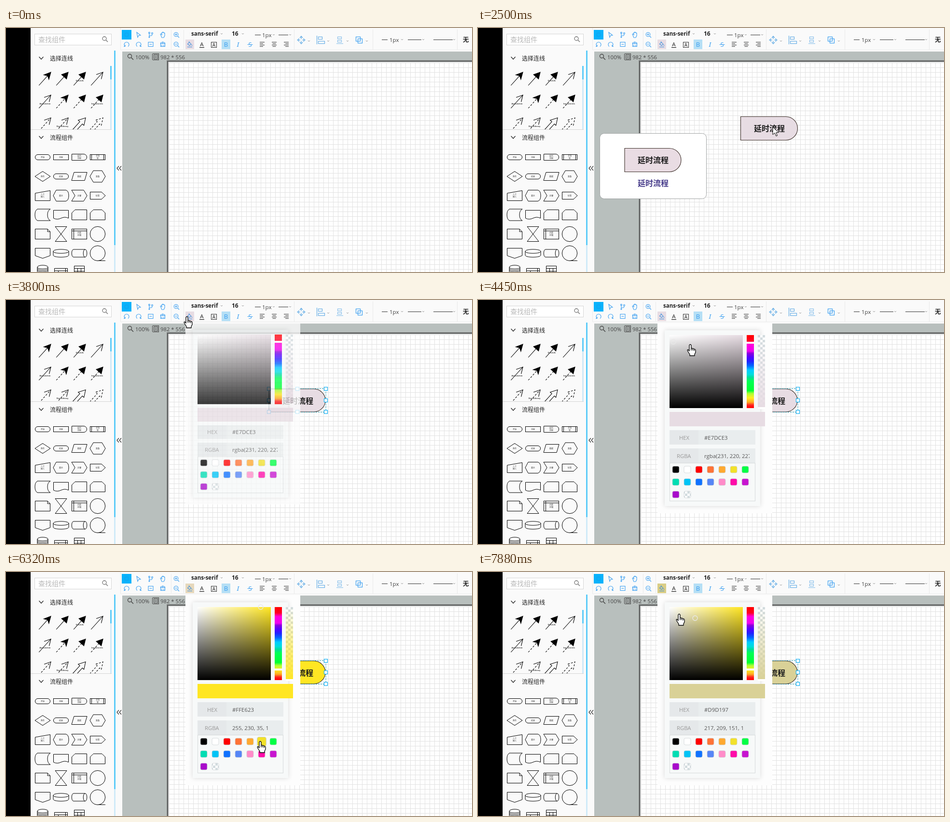
Animation of 966 by 508 pixels, one loop 8000 ms. Source, as an HTML page:

```html
<!DOCTYPE html>
<html lang="zh">
<head>
<meta charset="utf-8">
<style>
html, body { margin: 0; width: 100%; height: 100%; overflow: hidden; background: #fafafa; }
svg { display: block; width: 966px; height: 508px; font: 11.5px "Open Sans", "Noto Sans CJK SC", "Noto Sans CJK", sans-serif; }
text { stroke: none; fill: #444; }
.cjk { font-family: "Noto Sans CJK SC", "Noto Sans CJK", sans-serif; }
.big { font-size: 16px; font-weight: 700; fill: #1c1c1c; }
.tiny { font-size: 4px; fill: #333; text-anchor: middle; }
.paint { fill: var(--paint); }
.base { fill: var(--base); }
.icon { fill: var(--icon); }
.stop { stop-color: var(--paint); }
</style>
</head>
<body>
<svg id="stage" viewBox="0 0 966 508" fill="none"></svg>
<script>
const stage = document.getElementById('stage');
const path = (d, a = '') => `<path d="${d}" ${a}/>`;
const box = (x, y, w, h, a = '') => `<rect x="${x}" y="${y}" width="${w}" height="${h}" ${a}/>`;
const circle = (x, y, r, a = '') => `<circle cx="${x}" cy="${y}" r="${r}" ${a}/>`;
const text = (x, y, s, a = '') => `<text x="${x}" y="${y}" ${a}>${s}</text>`;
const group = (a, ...parts) => `<g ${a}>${parts.join('')}</g>`;
const at = (x, y, ...parts) => group(`transform="translate(${x} ${y})"`, ...parts);
const caret = (x, y) => path(`M${x - 2} ${y - 1}l2 2 2-2`, 'stroke="#999"');
const delay = (x, y, w, h, a) => path(`M${x} ${y}h${w - h / 2}a${h / 2} ${h / 2} 0 0 1 0 ${h}h${h / 2 - w}z`, a);
const gradient = (id, dir, stops) => `<linearGradient id="${id}" ${dir}>${stops}</linearGradient>`;
const stop = (o, c, a = '') => `<stop offset="${o}" stop-color="${c}" ${a}/>`;
const down = 'x1="0" y1="0" x2="0" y2="1"';

const hues = [
  [0, '#f00'], [.08, '#f02'], [.13, '#f0d'], [.22, '#e0e'], [.25, '#80d'], [.3, '#50f'], [.36, '#22f'],
  [.42, '#06f'], [.48, '#0cf'], [.54, '#0dd'], [.58, '#0d9'], [.63, '#0f5'], [.76, '#0f3'], [.8, '#af3'],
  [.86, '#fe2'], [.92, '#fa2'], [.96, '#f22'], [1, '#f00'],
];
const defs = `<defs>
<pattern id="grid" x="338" y="72" width="10" height="10" patternUnits="userSpaceOnUse">${path('M.5 0V10M0 .5H10', 'stroke="#e2e2e2"')}</pattern>
<pattern id="check" x="580" y="73" width="10" height="10" patternUnits="userSpaceOnUse">${box(0, 0, 10, 10, 'fill="#fff"')}${path('M0 0h5v10h5v-5h-10z', 'fill="#d3dcdf"')}</pattern>
${gradient('white', '', stop(0, '#fff') + stop(1, '#fff', 'stop-opacity="0"'))}
${gradient('black', down, stop(0, '#000', 'stop-opacity="0"') + stop(1, '#000'))}
${gradient('hue', down, hues.map(h => stop(...h)).join(''))}
${gradient('alpha', down, '<stop offset="0" class="stop" stop-opacity="0"/><stop offset="1" class="stop"/>')}
<clipPath id="lines">${box(51, 79, 165, 132)}</clipPath>
<clipPath id="value">${box(457, 309, 106, 30)}</clipPath>
<filter id="soft" x="-20%" y="-20%" width="140%" height="140%"><feDropShadow dx="0" dy="0" stdDeviation="5" flood-opacity=".14"/></filter>
</defs>`;

// Sidebar: connector arrows
const heads = {
  vee: path('M0 0L-14-7L-10 0L-14 7Z', 'fill="#000"'),
  tri: path('M0 0L-13-7V7Z', 'fill="#000"'),
  open: path('M-13-7L0 0L-13 7'),
};
function arrow([head, dash, label], i) {
  const x = 68 + i % 4 * 36, y = 92 + (i >> 2) * 47.5;
  const dashes = dash ? 'stroke-dasharray="4 3"' : '';
  const body = head === 'wide'
    ? path('M-37-3.5H-14V-8L0 0L-14 8V3.5H-37', dashes)
    : path(`M-37 0H${head === 'open' ? 0 : -10}`, dashes) + heads[head];
  return group(`transform="translate(${x + 25} ${y}) rotate(-48)" stroke="#000" stroke-width="1.1"`, body) +
    (label ? text(x + 13, y + 19, label, 'class="tiny" font-weight="700"') : '');
}
const arrows = [
  ['vee'], ['tri'], ['tri', 0, 'Extends'], ['open'],
  ['open', 0, 'Association'], ['vee', 1], ['tri', 1], ['tri', 1, 'Implements'],
  ['open', 1], ['open', 1, 'Dependency'], ['wide'], ['wide', 1],
].map(arrow).join('');

// Sidebar: flow shapes, each drawn around its own centre
const pill = box(-15.5, -5.5, 31, 11, 'rx="5.5"');
const shapes = [
  [pill, '开始'],
  [box(-15.5, -5.5, 31, 11), '流程'],
  [delay(-15.5, -6.5, 31, 13), '延时', '流程'],
  [box(-15.5, -5.5, 31, 11) + path('M-12.5-5.5V5.5M12.5-5.5V5.5'), '子流', '程'],
  [path('M-16 0L0-10.5L16 0L0 10.5Z'), '条件'],
  [pill, '结束'],
  [path('M-11-8.5H16L11 8.5H-16Z'), '数据'],
  [path('M-16 0L-9-12H9L16 0L9 12H-9Z'), '准备'],
  [path('M-15.5-5L15.5-10.5V10.5H-15.5Z'), '人工', '输入'],
  [path('M-16 0L-10-11.5H10Q16-10 16 0Q16 10 10 11.5H-10Z'), '展示'],
  [path('M-16-11.5H9L16 0L9 11.5H-16L-9 0Z'), '步骤'],
  [path('M-15.5-7.5H8L16 0L8 7.5H-15.5Z'), '标签'],
  [path('M-11-12H16Q10-9 10 0T16 12H-11Q-16 9-16 0T-11-12Z')],
  [path('M-15.5-9.5H15.5V7Q8 3 0 7T-15.5 7Z')],
  [path('M-9-10.5H15.5V10.5H-15.5V-4Z')],
  [path('M-9-10.5H9L15.5-4V10.5H-15.5V-4Z')],
  [path('M-15.5-10.5H10L15.5-5V10.5H-15.5ZM10-10.5V-5H15.5')],
  [path('M-12-15.5H12L-12 15.5H12Z')],
  [box(-15.5, -10.5, 31, 21) + path('M-15.5-6.5H15.5M-11.5-10.5V10.5'), '内部', '存储'],
  [circle(0, 0, 15.7)],
  [path('M-15.5-10.5H15.5V5L0 10.5L-15.5 5Z')],
  [path('M-16-4V4C-16 9.5 16 9.5 16 4V-4C16-9.5-16-9.5-16-4C-16 1.5 16 1.5 16-4')],
  [path('M-12-8H12C17-8 17 8 12 8H-12C-17 8-17-8-12-8M12-8C7-8 7 8 12 8')],
  [circle(0, 0, 15.7) + path('M0 15.5H16')],
  [path('M-11-11V12M11-11V12M-11-11C-11-16.5 11-16.5 11-11C11-6-11-6-11-11M-11-8C-11-3 11-3 11-8M-11-5C-11 0 11 0 11-5')],
  [path('M-13.5 12V-8.5H13.5V12M-13.5-3.5H13.5M-5.5-3.5V12M9.5-8.5V12')],
  [path('M-10.5 12V-13.5H10.5V12M-10.5-8.5H10.5M-10.5-2.5H10.5M-3.5-8.5V12M3.5-8.5V12')],
].map(([art, ...label], i) => at(76 + i % 4 * 38, 269 + (i >> 2) * 40,
  group('stroke="#000"', art),
  ...label.map((s, k) => text(0, 1.7 + (k - (label.length - 1) / 2) * 5.5, s, 'class="tiny cjk"')))).join('');

const lens = (x, y, s, c) => path(`M${x + 3} ${y + 3}l${s} ${s}`, `stroke="${c}" stroke-width="1.5"`) +
  circle(x, y, 4, `stroke="${c}" stroke-width="1.3"`);
const fold = y => path(`M68.5 ${y - 2}l4.5 5 4.5-5`, 'stroke="#222" stroke-width="1.2"');
const sidebar = box(0, 0, 51, 508, 'fill="#000"') +
  box(59.5, 12.5, 159, 23, 'fill="#fff" stroke="#d6d6d6"') +
  text(67, 29, '查找组件', 'class="cjk" style="font-size:14px;fill:#b8b8b8"') + lens(204, 22, 4, '#777') +
  fold(62) + text(91, 67.5, '选择连线', 'class="cjk" style="font-size:12px;fill:#222"') +
  group('clip-path="url(#lines)"', arrows) +
  box(216, 79, 3, 132, 'fill="#cfe9f7"') + box(216, 79, 3, 28, 'fill="#5ccbf8"') +
  path('M51 211.5H219', 'stroke="#d4d4d4"') +
  fold(227) + text(91, 233, '流程组件', 'class="cjk" style="font-size:12px;fill:#222"') +
  box(133, 250, 38, 38, 'id="hover" fill="#e4f3f7"') + shapes +
  box(224, 47, 3, 461, 'fill="#cfeaf8"') + box(224, 47, 3, 405, 'fill="#5ccbf8"') +
  path('M234 287.5l-4 4.5 4 4.5M239 287.5l-4 4.5 4 4.5', 'stroke="#333" stroke-width="1.2"');

// Toolbar
const bars = (x, offset) => path([10, 7, 10, 7].map((w, i) =>
  `M${x - 5 + (10 - w) * offset} ${29.5 + i * 3}h${w}`).join(''), 'stroke="#333" stroke-width="1.1"');
const undo = path('M-3 4.5A5 5 0 1 1 3 4.5M-3 4.5V1M-3 4.5H-6');
const tools = group('stroke="#3c9ff0" stroke-width="1.1"',
  at(250, 34, undo), group('transform="translate(275 34) scale(-1 1)"', undo),
  path('M271 9l8 6-4 .5-2 4z'),
  path('M297 10v9M297 16h4q2 0 2-4') + circle(297, 10, 1.5) + circle(303, 11, 1.5) + circle(297, 19, 1),
  path('M321 15l-1-2 1.5-1 1.5 2V9.5h1.5V8.5h1.5v1h1.5v1h1.5V16l-2 4h-4z'),
  box(295, 29.5, 10, 9) + path('M297.5 34h5'),
  box(320.5, 32.5, 9, 6) + path('M320 32l2-2h6l2 2M325 28v4M323 35v3M327 35v3'),
  circle(352.5, 13.5, 4.3) + path('M350 13.5h5M352.5 11v5M356 17l3 3'),
  circle(352.5, 33.5, 4.3) + path('M350 33.5h5M356 37l3 3'));
const format = box(372, 24, 18, 20, 'class="icon"') +
  path('M380 29.5l4 4.5-3.5 2.5-4-3zM379 28l2 3M376 39.5h10M385.5 35v2', 'stroke="#3c8fdd" stroke-width="1.1"') +
  text(406, 38, 'A', 'text-anchor="middle" style="fill:#222"') + path('M401 40.5h10', 'stroke="#222" stroke-width="1.3"') +
  box(425.5, 29.5, 11, 11, 'stroke="#333"') + text(431, 38.5, 'A', 'text-anchor="middle" style="font-size:10px;fill:#222"') +
  box(447, 24, 18, 20, 'fill="#b5dff5"') +
  group('text-anchor="middle" style="--t:#3c9ff0"',
    text(456, 39, 'B', 'style="font-size:13px;fill:var(--t)"'),
    text(481, 39, 'I', 'font-style="italic" style="font-family:\'Noto Serif\',serif;font-size:13px;fill:var(--t)"'),
    text(506, 39, 'S', 'style="font-size:13px;fill:var(--t)"')) +
  path('M500.5 34.5h11', 'stroke="#3c9ff0"') + bars(531, 0) + bars(556, .5) + bars(581, 1);
const arrange = group('stroke="#69afe6" stroke-width="1.2"',
  at(612, 25, path('M0-8l2.5 3h-5zM0 8l2.5-3h-5zM-8 0l3-2.5v5zM8 0l-3-2.5v5zM0-4v2M0 4v-2M-4 0h2M4 0h-2')),
  path('M644.5 16v18') + box(647.5, 18.5, 8, 5) + box(647.5, 27.5, 13, 5),
  group('opacity=".75"', path('M685 32.5h14') + box(687.5, 18.5, 8, 4) + box(687.5, 25.5, 8, 4)),
  group('stroke="#3c9ff0"', box(725.5, 18.5, 9, 9), box(729.5, 22.5, 9, 9)));
const toolbar = path('M237.5 0V45M368.5 4V44M342.5 4V44M597.5 3V45M760.5 3V45M935.5 3V45', 'stroke="#e9e9e9"') +
  path('M237 45.5H966', 'stroke="#ececec"') +
  box(240, 4, 20, 20, 'fill="#08b2fb"') + circle(250, 14, 4, 'stroke="#1a9eea"') + tools + format + arrange +
  text(384, 16, 'sans-serif', 'style="font-weight:700;fill:#222"') +
  text(468, 16, '16', 'style="font-weight:700;fill:#222;font-size:12px"') +
  text(531, 18.5, '1px') + text(795, 28.5, '1px') +
  path('M516 14.5h12M565 14.5h20M779 24.5h12M833 24.5h28M886 24.5h40', 'stroke="#333" stroke-width="1.1"') +
  [[447, 12], [491, 12], [555, 14], [589, 14], [628, 27], [668, 27], [708, 27], [748, 27],
    [821, 24], [865, 24], [929, 24]].map(p => caret(...p)).join('') +
  text(947, 29, '无', 'class="cjk" style="font-size:12.5px;font-weight:700;fill:#222"');

const canvas = box(241, 49, 725, 459, 'fill="#b8bfbd"') +
  box(333, 67, 640, 450, 'fill="#8c8f8e"') + box(334, 68, 640, 450, 'fill="#5e6060"') +
  box(336, 70, 640, 450, 'fill="#a8aaaa"') + box(337, 71, 640, 450, 'fill="#fff"') + box(338, 72, 640, 450, 'fill="url(#grid)"') +
  lens(256.5, 58.5, 4.5, '#444') + text(268, 64.5, '100%') +
  path('M306.5 55.5h8v9h-8zM303.5 54v12M316.5 54v12M304 53.5h13M304 66.5h13M308 58.5h5M308 61.5h5', 'stroke="#444"') +
  text(320, 64.5, '982 * 556', 'style="font-size:11.3px"');

const outline = 'stroke="#3a2c26" stroke-width="1.1"';
const popup = group('id="popup"',
  box(252.5, 219.5, 221, 136, 'rx="9" fill="#fff" stroke="#a2a5a5"'),
  delay(304, 250.5, 117, 49, 'fill="#e9dce3" ' + outline),
  text(331, 281, '延时流程', 'class="cjk big"'),
  text(331, 329, '延时流程', 'class="cjk big" style="fill:#483d8b"'));

const handles = [545, 604, 663].flatMap(x => [185, 209, 233].map(y => [x, y]))
  .filter(([x, y]) => x !== 604 || y !== 209)
  .map(([x, y]) => box(x - 3.5, y - 3.5, 7, 7, 'fill="#fff" stroke="#14b0f2" stroke-width="1.2"')).join('');
const node = group('id="node"', delay(.5, .5, 118, 49, 'id="body" class="paint" ' + outline),
  text(28, 31, '延时流程', 'class="cjk big"')) +
  group('id="picked"', box(545, 184.5, 118, 49, 'stroke="#2a9fb5" stroke-dasharray="3 2"'), handles);

// Colour picker
const colors = '#000 #fff #f00 #ff7336 #ffa930 #f2e12a #00ff44 #00ddb3 #00c4f6 #0f72ff #5686f6 #ff8cc9 #ff0ca9 #c715d0 #a80bcb url(#check)'.split(' ');
const swatches = colors.map((c, i) => at(410 + i % 7 * 24, 353 + Math.floor(i / 7) * 26,
  box(-7, -7, 14, 14, `rx="3" fill="${c}" stroke="#cfd4d6" stroke-width=".8" ${i === 5 ? 'id="yellow"' : ''}`))).join('');
const field = (y, label, x, id) => box(397, y, 60, 30, 'fill="#e5e8ea"') + box(457, y, 118, 30, 'fill="#e9edee"') +
  text(x, y + 19.5, label, 'style="font-size:11.3px;fill:#999"') +
  group(id === 'rgba' ? 'clip-path="url(#value)"' : '', text(469, y + 19.5, '', `id="${id}" style="font-size:11.4px;fill:#555"`));
const picker = group('id="picker"',
  box(372, 48, 238, 396, 'fill="#fdfdfd"'), box(387, 63, 198, 366, 'fill="#f7f9f9" filter="url(#soft)"'),
  box(397, 73, 152, 152, 'class="base"'), box(397, 73, 152, 152, 'fill="url(#white)"'), box(397, 73, 152, 152, 'fill="url(#black)"'),
  circle(0, 0, 5, 'id="spot" stroke="#e8e8e8" stroke-width="1.3"'),
  box(557, 73, 15, 152, 'fill="url(#hue)"'), box(556, 0, 17, 4, 'id="hueMark" fill="#fff"'),
  box(580, 73, 15, 152, 'fill="url(#check)"'), box(580, 73, 15, 152, 'fill="url(#alpha)"'), box(580, 223, 15, 4, 'fill="#fff"'),
  box(397, 233, 198, 30, 'class="paint"'),
  field(271, 'HEX', 417, 'hex'), field(309, 'RGBA', 412, 'rgba'),
  box(397.5, 339.5, 177, 79, 'stroke="#d6dadb"'), swatches);

const cursors = group('id="cursor" fill="#fff" stroke="#000" stroke-linejoin="round"',
  path('M0 0V16L4 12.5L7 19L9.5 18L6.8 11.7H12Z', 'id="arrow"'),
  path('M-2 2Q0-1 2 2V9Q4 7.5 5 9.5Q7 8.5 8 10.5Q11 10 11 13V17L9 21V24H-1V21L-5 15Q-7 11-4.5 11.5L-2 14ZM2 9V13M5 10V13M8 11V14', 'id="hand" stroke-width="1.3"'),
  path('M-3-8H-1L0-7L1-8H3M0-7V7M-3 8H-1L0 7L1 8H3', 'id="beam" fill="none"'),
  path('M0-11L4-6H1.5V-1.5H6V-4L11 0L6 4V1.5H1.5V6H4L0 11L-4 6H-1.5V1.5H-6V4L-11 0L-6-4V-1.5H-1.5V-6H-4Z', 'id="move"'));

stage.innerHTML = defs + box(0, 0, 966, 508, 'fill="#fafafa"') + canvas + sidebar + toolbar + popup + node + picker + cursors;

// Timeline: [time, x, y, cursor kind]
const route = [
  [130, 659, 393, 'arrow'], [910, 246, 319, 'arrow'], [1170, 165, 272, 'move'], [1300, 159, 265, 'move'],
  [1700, 170, 262, 'arrow'], [2350, 611, 206, 'arrow'], [2760, 611, 206, 'arrow'], [3280, 392, 78, 'arrow'],
  [3410, 375, 34, 'hand'], [4190, 375, 34, 'hand'], [4710, 504, 150, 'hand'], [4860, 510, 130, 'hand'],
  [5120, 545, 215, 'arrow'], [5380, 527, 318, 'beam'], [5510, 525, 332, 'beam'], [5660, 525, 337, 'arrow'],
  [6050, 527, 352, 'hand'], [6450, 527, 352, 'arrow'], [6710, 485, 190, 'hand'], [6970, 450, 96, 'hand'],
  [7230, 450, 96, 'hand'], [7880, 417, 87, 'hand'],
];
const looks = [
  [0, { paint: '#e7dce3', base: '#e7dce3', hex: '#E7DCE3', rgba: 'rgba(231, 220, 227, 1)', spot: [405, 87], hue: 87 }],
  [6320, { paint: '#ffe623', base: '#ffe623', hex: '#FFE623', rgba: '255, 230, 35, 1', spot: [528, 73], hue: 201 }],
  [6970, { paint: '#d9d197', base: '#ffe623', hex: '#D9D197', rgba: '217, 209, 151, 1', spot: [450, 96], hue: 201 }],
];
const tints = [[0, '#e7dce3'], [6320, '#e6d8bc'], [6450, '#f6e24a'], [6970, '#e0d482'], [7230, '#d9cd86']];
const starts = [0, 1700, 2500, 4860, 5660, 6320, 8000];
const last = (list, t) => list.filter(e => e[0] <= t).pop();
const $ = id => document.getElementById(id);
const show = (id, on) => { $(id).style.display = on ? '' : 'none'; };
const set = (id, name, v) => $(id).setAttribute(name, v);

// The screen refreshes about every 130 ms
function hold(t) {
  const i = starts.findLastIndex(s => s <= t), s = starts[i];
  const count = Math.round((starts[i + 1] - s) / 130);
  return s + 130 * Math.min(count - 1, Math.floor((t - s) / 130));
}

function draw(t) {
  const from = last(route, t);
  show('cursor', from);
  if (from) {
    const to = route[route.indexOf(from) + 1] || from;
    const k = to === from ? 0 : (t - from[0]) / (to[0] - from[0]);
    const [x, y] = [1, 2].map(i => Math.round(from[i] + (to[i] - from[i]) * k));
    set('cursor', 'transform', `translate(${x} ${y})`);
    for (const kind of ['arrow', 'hand', 'beam', 'move']) show(kind, kind === from[3]);
  }
  const picked = t >= 2760;
  show('hover', t >= 1170 && t < 1700);
  show('popup', t >= 1170 && t < 2630);
  show('node', t >= 2350);
  show('picked', picked);
  set('node', 'transform', picked ? 'translate(545 185)' : 'translate(544 184)');
  set('body', 'transform', picked ? 'translate(-.5 -.5) scale(.992 .98)' : '');

  const p = t < 3800 ? 0 : t < 3930 ? .77 : 1;
  show('picker', p);
  set('picker', 'opacity', p);
  set('picker', 'transform', `translate(0 48) scale(1 ${.8 + .2 * p}) translate(0 -48)`);
  set('yellow', 'transform', `scale(${t >= 6050 && t < 6580 ? 1.35 : 1})`);

  const look = last(looks, t)[1];
  stage.style.setProperty('--paint', look.paint);
  stage.style.setProperty('--base', look.base);
  stage.style.setProperty('--icon', last(tints, t)[1]);
  $('hex').textContent = look.hex;
  $('rgba').textContent = look.rgba;
  set('spot', 'transform', `translate(${look.spot})`);
  set('hueMark', 'y', look.hue);
}

function tick() {
  draw(hold(performance.now() % 8000));
  requestAnimationFrame(tick);
}
tick();
</script>
</body>
</html>
```
